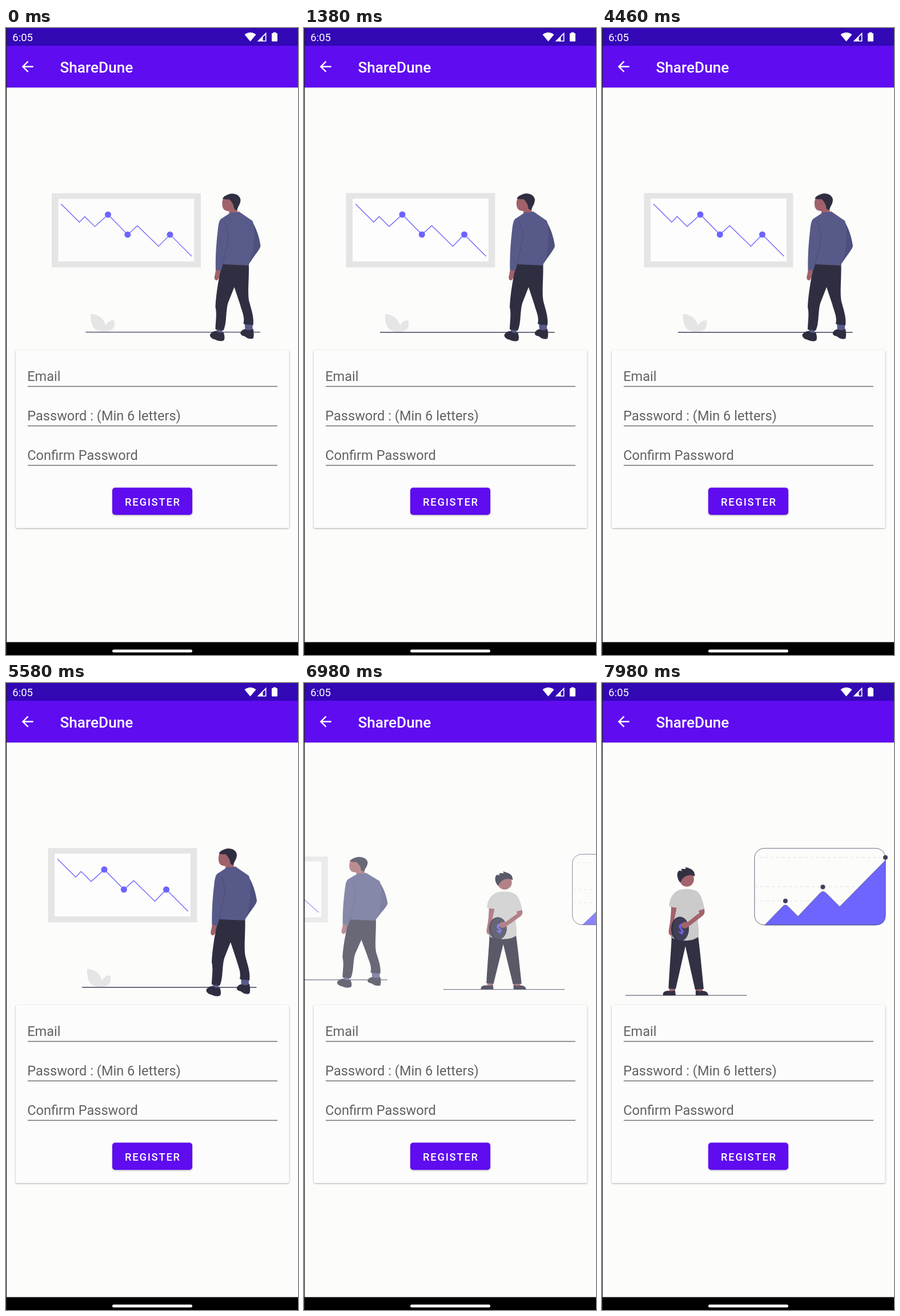
An HTML page that plays this animation: 511x1096 px, repeating every 8 s.

```html
<!DOCTYPE html>
<html lang="en">
<head>
<meta charset="utf-8">
<title>Register</title>
<style>
  html, body { margin: 0; width: 100%; height: 100%; overflow: hidden; background: #fcfcfb; }
  svg { display: block; width: 100%; height: 100%; }
  text { font-family: Roboto, sans-serif; fill: #fff; }
  .medium { font-weight: 500; }
  .hint { font-size: 23.6px; fill: #626262; }
  .ink { fill: #2f2e41; }
  .slate { fill: #3f3d56; }
  .skin { fill: #a0616a; }
  .blue { fill: #575a89; }
  .violet { fill: #6c63ff; }
  .pale { fill: #e5e5e5; }
  .shirt { fill: #cbcbcb; }
  .line { fill: none; stroke: #3f3d56; }
  .card { filter: drop-shadow(0 1.2px 1.6px rgba(0, 0, 0, .32)); }
</style>
</head>
<body>
<svg viewBox="0 0 511 1096" preserveAspectRatio="none">
  <rect width="511" height="1096" fill="#fcfcfb"/>

  <g id="falling">
    <path class="pale" fill-rule="evenodd" d="M73.5 288.5H334.5V418.5H73.5ZM85.3 298.5V408H322.7V298.5Z"/>
    <path fill="#fdfdfd" d="M85.3 298.5H322.7V408H85.3Z"/>
    <path fill="none" stroke="#6c63ff" stroke-width="1.3" d="M90 307.5L122 339.3L131.5 329.5L149 347L172 326L206.5 361L223.5 345.5L260.5 381.5L280.5 361L318.5 399"/>
    <g class="violet">
      <circle cx="172" cy="326" r="5.5"/>
      <circle cx="206.3" cy="361" r="5.5"/>
      <circle cx="280.5" cy="361" r="5.5"/>
    </g>
    <path class="pale" d="M142 500C141 517 146 531 163 531H169C183 530 184 520 183 511C176 511 171 514 168 520C164 507 156 501 142 500Z"/>
    <path class="line" stroke-width="1.3" d="M133 532H438.5"/>

    <path class="skin" d="M374 297C371 302 371 313 375 317C378 320 383 320 384 320V326H399L398 312L390 297Z"/>
    <path class="ink" d="M372.5 298C375 293 380 292 383 290.5C391 287 403 291 404 300C404 308 399 312 398 318C394 318 392 316 392 311C390 306 388 302 384 299C380 300 376 299 372.5 298Z"/>
    <path class="skin" d="M361 421L369 423C369 431 367 438 363 441C359 442 357 437 359 432Z"/>
    <path class="blue" d="M362 525H372V534H362ZM411 514H425V529H412Z"/>
    <path class="ink" d="M372 411L418.5 413C419 440 416 465 419 478C422 490 428 505 426 520C421 518 415 520 409 517C412 505 406 495 403 483L393 453L382 481C378 495 380 517 374 529L360 527C360 515 363 500 360 488C361 465 366 435 372 411Z"/>
    <path class="ink" d="M350.5 536C354 531 359 529 362 530C367 534 371 533 374 532C377 540 376 544 375 546C370 549 364 547 360 545C355 544 350 541 350.5 536ZM404 532C407 527 411 526 414 527C419 530 423 527 426 526C428 535 427 541 426 543C419 545 415 542 411 539C406 538 403 536 404 532Z"/>
    <path fill="#4d507c" d="M423 336C431 348 437 365 439 381C438 387 428 398 420 411Z"/>
    <path class="blue" d="M388 321.5C393 323 398 322 401 320.5L425 337C429 349 428 362 427 377L424 400L418 415L373 413L370 424L360.5 423C360 405 361 380 364 355C365 345 366 338 369 334Z"/>
    <path fill="none" stroke="#464970" stroke-width=".8" d="M376 338C383 352 384 362 381 377L373 413"/>
  </g>

  <g id="rising">
    <g transform="translate(-15.7 -2.5) scale(1 1.006)">
      <rect class="line" x="267" y="289" width="229" height="134" rx="17" stroke-width=".8"/>
      <path fill="none" stroke="#e2e2e6" stroke-dasharray="6 4" d="M274 305H490M267 356H496M267 381H496"/>
      <path class="violet" stroke="#3f3d56" stroke-width=".6" d="M285 423L316 391Q321 385 326 391L343 408L381 368Q387 361 393 368L416 391L496 310V406Q496 423 479 423Z"/>
      <g class="slate">
        <circle cx="321" cy="381" r="4"/>
        <circle cx="386.5" cy="356.5" r="4"/>
        <circle cx="496" cy="305" r="4"/>
      </g>
      <path class="line" stroke-width="1.2" d="M41 546H253.5"/>

      <path class="skin" d="M118 533H128V541H118ZM164 533H176V541H164Z"/>
      <path class="ink" d="M107 546C106 540 110 538 117 538C122 540 126 537 128 538L129 546ZM164 546V538C168 537 171 540 175 538C182 538 186 541 186 546Z"/>
      <path class="ink" d="M122 441C138 448 158 448 168 440C172 470 175 505 178 535L163 536L146 460L129 535L116.5 534C118 500 121 470 122 441Z"/>
      <path class="skin" d="M121 389L131 391C130 410 127 425 128 438C124 443 118 443 117 437C116 430 121 420 121 389Z"/>
      <ellipse class="skin" cx="148.5" cy="343" rx="12.5" ry="13"/>
      <path class="ink" d="M137 349C131 342 130 331 135 328L140 328.5L138.5 325H147L145.5 321.5C152 324 163 325 162.5 338C150 333 142 338 137 349Z"/>
      <path class="shirt" d="M134 362C142 359 157 359 164 363C172 366 177 380 179.5 396L169 399C166 420 171 430 169 443C162 451 140 453 123 446C124 425 128 405 131 393L117.5 391C118 378 123 367 134 362Z"/>
      <ellipse class="ink" cx="136.5" cy="430" rx="15.5" ry="21.5"/>
      <ellipse class="slate" cx="138" cy="430" rx="14" ry="20"/>
      <path fill="none" stroke="#6c63ff" stroke-width="1.8" d="M143 426C140 422 135 423 135.5 427C136 431 142 430 142 434C142 438 137 438 135 434M137 421L140 440"/>
      <path class="skin" d="M169 398L179 395C180 400 180 404 176 407L150 427C145 431 139 428 138 423C140 418 145 417 150 418L170 402Z"/>
    </g>
  </g>

  <rect width="511" height="31" fill="#3308b5"/>
  <rect y="31" width="511" height="73" fill="#5f0cf1"/>
  <rect y="104" width="511" height="1.5" fill="#000" opacity=".07"/>
  <text x="11.3" y="22.5" font-size="18.5">6:05</text>
  <g fill="#fff">
    <path d="M427.5 23.5L417.5 11.5Q427.5 4 437.5 11.5Z"/>
    <path fill-rule="evenodd" d="M439.5 23.5L455.5 7.5V23.5ZM449.5 16V22H453.8V11.7Z"/>
    <path d="M467.5 9V7.5H472.5V9H474Q475 9 475 10V22.5Q475 23.5 474 23.5H466Q465 23.5 465 22.5V10Q465 9 466 9Z"/>
    <path transform="translate(22.7 52.5) scale(1.25)" d="M20 11H7.83l5.59-5.59L12 4l-8 8 8 8 1.41-1.41L7.83 13H20z"/>
  </g>
  <text class="medium" x="94.5" y="78" font-size="26.2">ShareDune</text>

  <rect class="card" x="17" y="563" width="478.5" height="311" rx="2" fill="#fcfcfc"/>
  <text class="hint" x="37.2" y="617">Email</text>
  <text class="hint" x="37.2" y="686">Password : (Min 6 letters)</text>
  <text class="hint" x="37.2" y="755">Confirm Password</text>
  <path stroke="#707070" stroke-width="1.3" d="M38 626.5H475M38 695.5H475M38 764.5H475"/>
  <rect class="card" x="186" y="803.5" width="140" height="47.5" rx="5" fill="#5f0cf1"/>
  <text class="medium" x="208" y="834.5" font-size="18.4" letter-spacing="1.75">REGISTER</text>

  <rect y="1073.5" width="511" height="23" fill="#000"/>
  <rect x="186" y="1086.5" width="140" height="5" rx="2.5" fill="#fff"/>
  <rect width="1.2" height="1096" fill="#222"/>
</svg>
<script>
  const LOOP = 8000, PAGE_WIDTH = 511, CENTER_Y = 418;
  const SLIDE_MS = 3240, FIRST_SLIDE = -1675, NEXT_SLIDE = 6553;
  const falling = document.getElementById('falling');
  const rising = document.getElementById('rising');

  // Steep ease-out, from 0 to 1
  function slide(elapsed) {
    const p = Math.min(Math.max(elapsed / SLIDE_MS, 0), 1);
    return 1 - (1 - p) ** 6;
  }

  // The screen stalls for 100 ms in every 840 ms
  function stall(t) {
    const phase = (t + 20) % 840;
    return t - Math.max(phase - 740, 0);
  }

  // Pages away from the middle get flatter and paler
  function placePage(page, position) {
    const away = Math.min(Math.abs(position), 1);
    const scale = 1 - 0.2 * away;
    page.setAttribute('transform',
      `translate(${position * PAGE_WIDTH} ${CENTER_Y * (1 - scale)}) scale(1 ${scale})`);
    page.setAttribute('opacity', 1 - 0.5 * away);
  }

  function draw(now) {
    const t = stall(now % LOOP);
    const position = 1 - slide(t - FIRST_SLIDE) - slide(t - NEXT_SLIDE);
    placePage(falling, position);
    placePage(rising, position + 1);
    requestAnimationFrame(draw);
  }
  draw(0);
</script>
</body>
</html>
```
